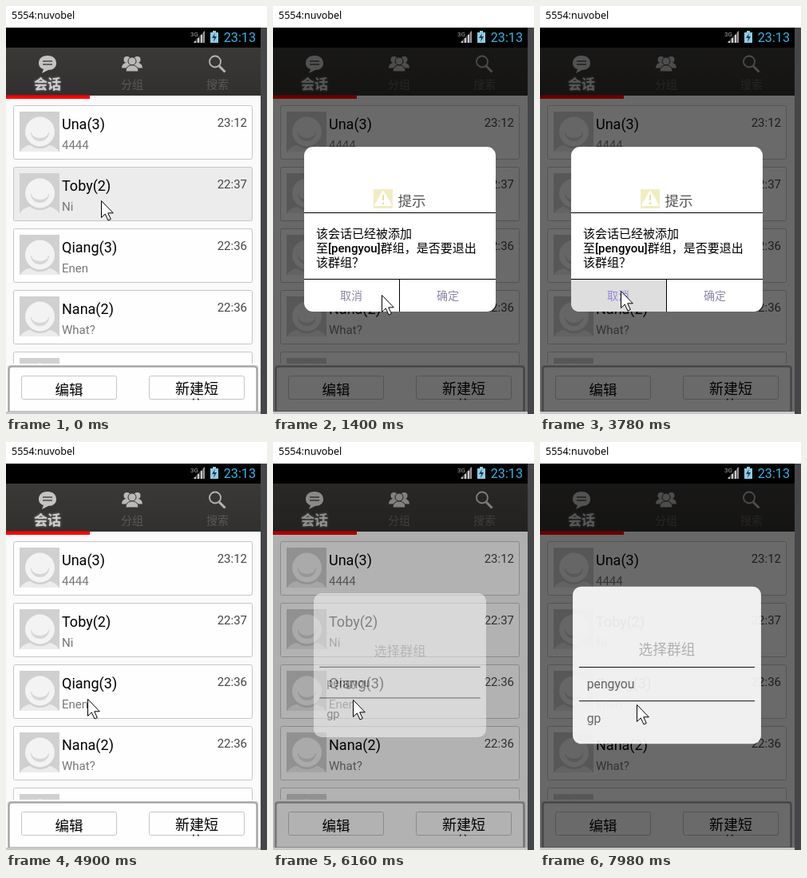
An HTML page for the animation above (8000 ms loop, 327 by 510 pixels).

```html
<!DOCTYPE html>
<html lang="zh-CN">
<head>
<meta charset="utf-8">
<title>Messages</title>
<style>
html, body { margin: 0; width: 100%; height: 100%; overflow: hidden; background: #fff; }
svg { display: block; width: 327px; height: 510px; }
text { font-family: Roboto, "Noto Sans CJK SC", "Noto Sans CJK", sans-serif; white-space: pre; }
.m { text-anchor: middle; }
.e { text-anchor: end; }
.b { font-weight: 500; }
</style>
</head>
<body>
<svg id="stage" viewBox="0 0 327 510"></svg>
<script>
const STEP = 140, LOOP = 8000;

const rect = (x, y, w, h, fill, more = '') =>
  `<rect x="${x}" y="${y}" width="${w}" height="${h}" fill="${fill}" ${more}/>`;
const text = (x, y, size, fill, str, cls = '') =>
  `<text x="${x}" y="${y}" font-size="${size}" fill="${fill}" class="${cls}">${str}</text>`;
const path = (d, fill, more = '') => `<path d="${d}" fill="${fill}" ${more}/>`;

const avatar = `<g id="avatar" clip-path="url(#square)">
  ${rect(0, 0, 50, 50, '#d0d0d0')}
  <ellipse cx="25" cy="53" rx="25" ry="13" fill="#ececec"/>
  <circle cx="25.5" cy="25" r="21" fill="#d0d0d0"/>
  <circle cx="25.5" cy="25" r="18.5" fill="#f3f3f3"/>
  ${path('M14 26H37A11.5 11 0 0 1 14 26Z', '#d6d6d6')}
  ${path('M15 26H36A10.5 7 0 0 1 15 26Z', '#f3f3f3')}
</g>`;

const chats = [
  ['Una(3)', '4444', '23:12'], ['Toby(2)', 'Ni', '22:37'],
  ['Qiang(3)', 'Enen', '22:36'], ['Nana(2)', 'What?', '22:36'], ['', '', '']
];
const card = ([name, note, time], i) => `<g transform="translate(0 ${124 + 77 * i})">
  ${rect(9.5, .5, 299, 67, '#fefefe', `id="card${i}" stroke="#c6c6c6" rx="2"`)}
  <use href="#avatar" x="17" y="8"/>
  ${text(70, 30, 18, '#000', name)}
  ${text(70, 55, 15, '#777', note)}
  ${text(302, 27, 15, '#444', time, 'e')}
</g>`;

const person = (x, y, s) => `<g transform="translate(${x} ${y}) scale(${s})">
  <circle cy="-5" r="5" fill="#b9b9b9"/>
  ${path('M-8 8C-8 2-4 1-2 0H2C4 1 8 2 8 8Z', '#b9b9b9')}
</g>`;

const header = `
  ${rect(0, 27, 319, 25, '#000')}
  ${text(231, 38, 8, '#aaa', '3G')}
  ${path('M234 46L249 31V46Z', '#4a4a4a')}
  ${path('M236 46V44H238V46ZM240 46V40H242V46ZM244 46V36H246V46Z', '#ccc')}
  ${path('M247 46V33L249 31V46Z', '#999')}
  ${path('M259 31H263V33H266V46H256V33H259Z', '#8fcbe6')}
  ${path('M262 34L258 40H261L260 45L264 38H261Z', '#153b4d')}
  ${text(313, 45, 16.2, '#33b5e5', '23:13', 'e')}
  ${rect(0, 52, 319, 60, 'url(#bar)')}
  ${path('M52 62C59 62 63 66 63 71.500C63 77 59 80 53 80L45 84L47 79C43 78 41 75 41 71.500C41 66 45 62 52 62Z', '#c4c4c4')}
  ${path('M46 69H58M46 73H58', 'none', 'stroke="#4a4846" stroke-width="1.500"')}
  ${person(151.5, 71, .8)}${person(164.500, 71, .8)}
  <g stroke="#353331" stroke-width="1">${person(158, 74, 1)}</g>
  <circle cx="262" cy="69.500" r="7" fill="none" stroke="#b4b4b4" stroke-width="1.800"/>
  ${path('M267 75L274.500 82.500', 'none', 'stroke="#b4b4b4" stroke-width="3"')}
  <g style="text-shadow:0 0 3px #999;font-weight:700">${text(52, 104, 17, '#d0d0d0', '会话', 'm')}</g>
  ${text(158, 103, 14, '#5b5957', '分组', 'm')}
  ${text(265, 103, 14, '#5b5957', '搜索', 'm')}
  ${rect(0, 111.500, 105, 4.500, '#f00')}`;

const footer = `
  ${rect(0, 447, 319, 60, '#fafafa')}
  ${path('M2 507V453Q2 449 6 449H312Q316 449 316 453V507Z', '#bdbdbd')}
  ${path('M4 507V454Q4 451 7 451H311Q314 451 314 454V507Z', '#fefefe', 'stroke="#858585"')}
  ${[19.5, 179.5].map(x => rect(x, 462.5, 119, 29, '#fefefe', 'stroke="#c6c6c6" rx="2"')).join('')}
  ${text(79, 485.5, 17.5, '#000', '编辑', 'm b')}
  <g clip-path="url(#button)">
    ${text(239, 485, 18, '#000', '新建短', 'm b')}
    ${text(239, 505.5, 18, '#000', '信', 'm b')}
  </g>`;

const confirmBox = `<g id="confirm">
  ${rect(39, 176, 240, 206, '#fff', 'rx="11"')}
  ${path('M39 342H158V382H50Q39 382 39 371Z', '#dedede', 'id="cancelBg"')}
  ${rect(126, 229, 24, 24, '#f1edc0')}
  ${path('M138 232L148 249H128Z', '#fff', 'stroke="#fff" stroke-width="2" stroke-linejoin="round"')}
  ${path('M138 236V243M138 245.500V248', 'none', 'stroke="#e6dfa0" stroke-width="2"')}
  ${text(174, 250, 17.5, '#555', '提示', 'm')}
  ${rect(39, 258, 240, 1, '#000')}
  ${text(54, 290, 15, '#000', '该会话已经被添加', 'b')}
  ${text(54, 308, 15, '#000', '至[pengyou]群组，是否要退出', 'b')}
  ${text(54, 326, 15, '#000', '该群组？', 'b')}
  ${rect(39, 341, 240, 1, '#000')}${rect(158, 341, 1, 41, '#000')}
  <g id="cancel" fill="#8c88a4"><text x="98" y="367" font-size="14" class="m">取消</text></g>
  ${text(219, 367, 14, '#8c88a4', '确定', 'm')}
</g>`;

const groupBox = `<g id="groups">
  ${rect(39, 179, 240, 200, '#fff', 'rx="11"')}
  ${text(159, 266, 18, '#b8b8b8', '选择群组', 'm')}
  ${rect(47, 325, 224, 42, '#dedede', 'id="groupBg"')}
  ${rect(47, 281, 224, 1, '#000')}${rect(47, 324, 224, 1, '#000')}
  ${text(57, 309, 16, '#666', 'pengyou')}
  ${text(57, 352, 16, '#666', 'gp')}
</g>`;

stage.innerHTML = `<defs>
  <clipPath id="square">${rect(0, 0, 50, 50, '#000')}</clipPath>
  <clipPath id="list">${rect(0, 112, 319, 335, '#000')}</clipPath>
  <clipPath id="button">${rect(180, 463, 118, 29.5, '#000')}</clipPath>
  <linearGradient id="bar" x2="0" y2="1"><stop stop-color="#3b3937"/><stop offset="1" stop-color="#31302e"/></linearGradient>
  ${avatar}
</defs>
${rect(0, 0, 327, 510, '#fff')}
<text x="7" y="16" font-size="12.500" style="font-family:'Noto Sans','Open Sans',sans-serif">5554:nuvobel</text>
${rect(319, 27, 8, 483, '#444648')}
${rect(0, 112, 319, 398, '#fafafa')}
<g clip-path="url(#list)">${chats.map(card).join('')}</g>
${header}${footer}
${rect(0, 507, 319, 3, '#c8c8c8')}
${rect(0, 52, 319, 455, '#000', 'id="dim"')}
${confirmBox}${groupBox}
${path('M.5 .5V21.500L5.300 17L9 25L12.300 23.500L8.700 15.800H15.300Z', '#fff', 'id="cursor" stroke="#000"')}`;

const $ = id => document.getElementById(id);

// [time, x, y] of the pointer tip
const route = [
  [0, 119, 243], [560, 119, 243], [1400, 136, 361], [1680, 181, 379], [1820, 183, 379],
  [2520, 101, 361], [2800, 101, 361], [3640, 101, 356], [4060, 101, 356], [4900, 102, 321],
  [5740, 102, 321], [5880, 100, 322], [6440, 100, 322], [7000, 94, 350], [7560, 94, 350],
  [7700, 121, 331], [7840, 121, 331], [7980, 121, 328], [LOOP, 121, 328]
];
// [time, dim, opacity, scale], each held until the next
const confirmKeys = [[0, 0, 0, 1], [140, .3, .5, .9], [280, .55, .9, .98], [420, .58, 1, 1], [3920, 0, 0, 1]];
const groupKeys = [[0, 0, 0, 1], [6160, .3, .5, .9], [6300, .58, 1, 1], [7980, .58, .9, .983]];

const held = (keys, t) => keys.filter(k => k[0] <= t).pop();
const within = (t, a, b) => t >= a && t < b;

function pointer(t) {
  const i = route.findIndex(k => k[0] > t);
  const [t0, x0, y0] = route[i - 1], [t1, x1, y1] = route[i];
  const k = (t - t0) / (t1 - t0);
  return [x0 + (x1 - x0) * k, y0 + (y1 - y0) * k].map(Math.round);
}

function pose(id, [, , opacity, scale]) {
  $(id).setAttribute('opacity', opacity);
  $(id).setAttribute('transform', `translate(159 279) scale(${scale}) translate(-159 -279)`);
}

function draw(now) {
  const t = Math.floor(now % LOOP / STEP) * STEP;
  const a = held(confirmKeys, t), b = held(groupKeys, t);
  pose('confirm', a);
  pose('groups', b);
  $('dim').setAttribute('opacity', Math.max(a[1], b[1]));
  $('card1').setAttribute('fill', t < 140 ? '#ececec' : '#fefefe');
  $('card2').setAttribute('fill', within(t, 5460, 6020) ? '#ececec' : '#fefefe');
  const pressed = within(t, 3640, 3920);
  $('cancelBg').setAttribute('opacity', +pressed);
  $('cancel').setAttribute('fill', pressed ? '#9488dc' : '#8c88a4');
  $('groupBg').setAttribute('opacity', +within(t, 7280, 7980));
  $('cursor').setAttribute('transform', `translate(${pointer(t)})`);
}

const start = performance.now();
function tick() {
  draw(performance.now() - start);
  requestAnimationFrame(tick);
}
tick();
</script>
</body>
</html>
```
